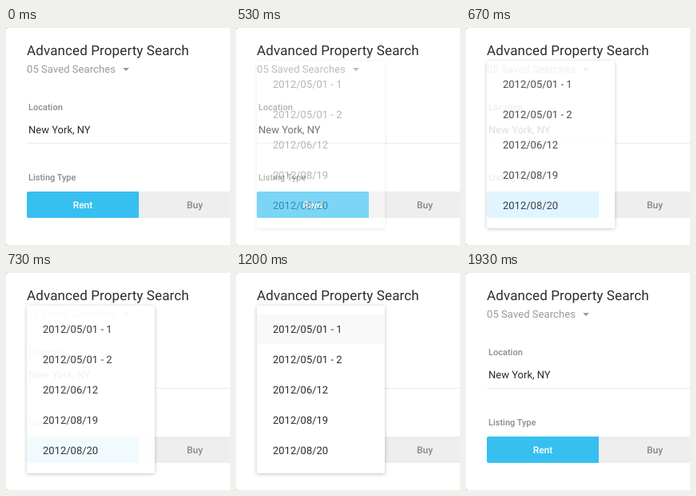
Recreate the animation shown at these times as an HTML page. Size 280 px wide and 272 px high, loop 2.14 s.

```html
<!DOCTYPE html>
<html lang="en">
<head>
<meta charset="utf-8">
<title>Property search</title>
<style>
  html, body { margin: 0; width: 100%; height: 100%; overflow: hidden; background: #777; }
  svg { display: block; width: 280px; height: 272px; font: 13px Roboto, sans-serif; text-rendering: geometricPrecision; }
  .title { font-size: 17px; letter-spacing: .12px; fill: #2b2b33; }
  .muted { fill: #999; letter-spacing: .07px; }
  .label { font-size: 11px; font-weight: 500; fill: #8a8a8a; }
  .tab { font-size: 12px; font-weight: 500; text-anchor: middle; }
  .dark { fill: #2b2b33; }
  .panel { filter: drop-shadow(0 1.5px 2.5px rgba(0, 0, 0, .25)); }
  #menu, #hover { opacity: 0; }
</style>
</head>
<body>
<svg viewBox="0 0 280 272">
  <rect width="284" height="272" rx="2" fill="#fff"/>
  <text class="title" x="26" y="34">Advanced Property Search</text>
  <text class="muted" x="26" y="56">05 Saved Searches</text>
  <path d="M146 50h8l-4 4z" fill="#999"/>
  <text class="label" x="28" y="103">Location</text>
  <text class="dark" x="28" y="132">New York, NY</text>
  <rect x="26" y="144" width="254" height="1" fill="#eaeaea"/>
  <text class="label" x="28" y="191">Listing Type</text>
  <rect x="166" y="205" width="114" height="33" fill="#eee"/>
  <path d="M166 205v33H28a2 2 0 0 1-2-2v-29a2 2 0 0 1 2-2z" fill="#37bff0"/>
  <text class="tab" x="96" y="226" fill="#fff">Rent</text>
  <text class="tab" x="236" y="226" fill="#888">Buy</text>
  <g id="menu">
    <rect class="panel" x="26" y="41" width="160" height="210" rx="2" fill="#fff"/>
    <rect id="hover" x="26" y="52" width="160" height="37" fill="#f9f9f9"/>
  </g>
</svg>
<script>
  const LOOP = 2140, FPS = 15, CLOSE = 1670;
  const $ = id => document.getElementById(id);

  ["2012/05/01 - 1", "2012/05/01 - 2", "2012/06/12", "2012/08/19", "2012/08/20"].forEach((date, i) => {
    const row = document.createElementNS("http://www.w3.org/2000/svg", "text");
    row.setAttribute("class", "dark");
    row.setAttribute("x", 46);
    row.setAttribute("y", 75 + 38 * i);
    row.textContent = date;
    $("menu").append(row);
  });

  const linear = u => u;
  const quintInOut = u => u < .5 ? 16 * u ** 5 : 1 - 16 * (1 - u) ** 5;

  // Fades in at a fixed frame rate, then vanishes at once when the menu closes.
  function fade(id, start, length, ease) {
    const frames = [];
    for (let i = 0; i * 1000 / FPS < LOOP; i++) {
      const ms = Math.round(i * 100 / FPS) * 10;
      const u = Math.min(1, Math.max(0, (ms - start) / length));
      frames.push({ offset: ms / LOOP, opacity: ms < CLOSE ? ease(u) : 0, easing: "step-end" });
    }
    if (frames.at(-1).offset < 1) frames.push({ offset: 1, opacity: 0 });
    $(id).animate(frames, { duration: LOOP, iterations: Infinity });
  }

  fade("menu", 70, 990, quintInOut);
  fade("hover", 1000, 200, linear);
</script>
</body>
</html>
```
